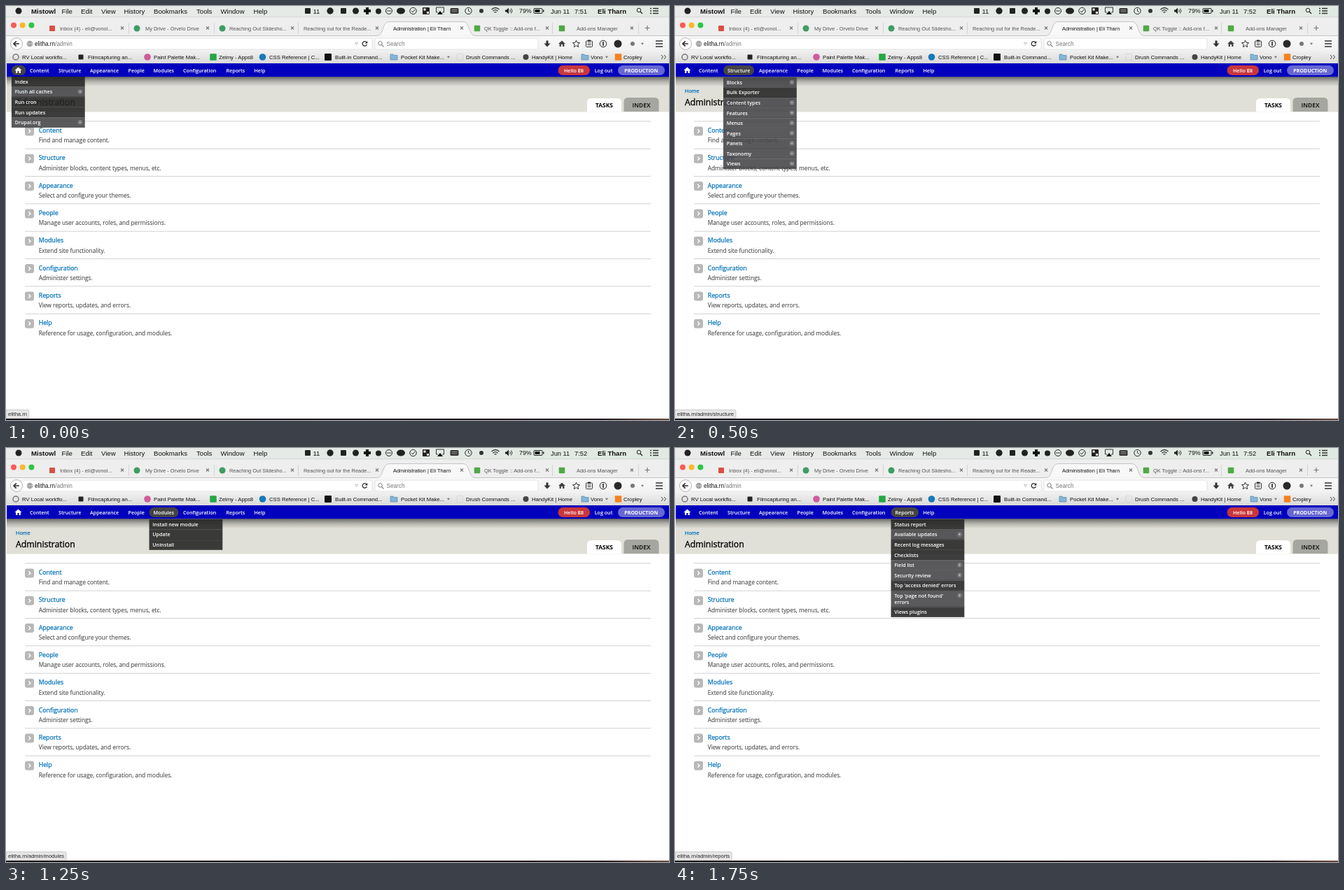
An HTML page for the animation above (2 s loop, 947 by 592 pixels).

```html
<!DOCTYPE html>
<html lang="en">
<head>
<meta charset="utf-8">
<title>Admin menu tour</title>
<style>
  html, body { margin: 0; width: 100%; height: 100%; overflow: hidden; background: #fff; }
  svg { display: block; width: 947px; height: 592px; }
  text { white-space: pre; }
  .ui { font-family: "Liberation Sans", Arial, sans-serif; }
  .page { font-family: "Open Sans", "Noto Sans", sans-serif; }
  .bar { font-size: 9.6px; fill: #111; }
  .tab { font-size: 7.4px; fill: #555; }
  .mark { font-size: 7.7px; fill: #111; }
  .url { font-size: 8.2px; fill: #111; }
  .status { font-size: 7.55px; fill: #222; }
  .nav { font-size: 7.15px; font-weight: 600; fill: #fff; }
  .link { font-size: 8.8px; fill: #0071b8; stroke: #0071b8; stroke-width: .25px; }
  .title { font-size: 12.3px; fill: #000; stroke: #000; stroke-width: .3px; }
  .desc { font-size: 8.33px; fill: #444; stroke: #444; stroke-width: .08px; }
  .task { font-size: 8.4px; font-weight: 700; text-anchor: middle; }
  .line { fill: none; stroke: #333; stroke-width: 1; }
</style>
</head>
<body>
<svg id="stage" viewBox="0 0 947 592" xmlns="http://www.w3.org/2000/svg"></svg>
<script>
const STEP = 250;
const HOST = 'elitha.rn';

const rect = (x, y, w, h, fill, r = 0, more = '') =>
  `<rect x="${x}" y="${y}" width="${w}" height="${h}" rx="${r}" fill="${fill}" ${more}/>`;
const dot = (x, y, r, fill, more = '') =>
  `<circle cx="${x}" cy="${y}" r="${r}" fill="${fill}" ${more}/>`;
const path = (d, more = 'class="line"') => `<path d="${d}" ${more}/>`;
const text = (x, y, s, cls, more = '') => `<text x="${x}" y="${y}" class="${cls}" ${more}>${s}</text>`;
const square = (x, y, size, fill) => rect(x - size / 2, y - size / 2, size, size, fill, 1);
const ring = (x, y, r, color = '#222', w = 1) =>
  dot(x, y, r, 'none', `stroke="${color}" stroke-width="${w}"`);
const solid = (d, fill = '#333') => path(d, `fill="${fill}"`);
const down = (x, y) => solid(`M${x - 2} ${y - 1.3}h4l-2 3z`, '#777');
const lens = (x, y, color) =>
  ring(x - 1, y - 1, 2.8, color) + path(`M${x + 1} ${y + 1}l3 3`, `stroke="${color}" stroke-width="1.2"`);
const cross = (x, y) => path(`M${x - 2} ${y - 2}l4 4m0 -4l-4 4`, 'stroke="#777" stroke-width="1.1"');
const house = (x, y, fill) =>
  solid(`M${x - 5} ${y}L${x} ${y - 4.5}L${x + 5} ${y}H${x + 3.4}V${y + 4}H${x + 1.1}V${y + 1}H${x - 1.1}V${y + 4}H${x - 3.4}V${y}Z`, fill);
const folder = (x, y) =>
  path(`M${x - 5} ${y + 4}v-8h4l1 1.5h5v6.5z`, 'fill="#86b5d6" stroke="#5588aa" stroke-width=".7"');
const gradient = (id, vertical, stops) =>
  `<linearGradient id="${id}" x2="${vertical ? 0 : 1}" y2="${vertical ? 1 : 0}">`
  + stops.map(([at, color]) => `<stop offset="${at}" stop-color="${color}"/>`).join('') + '</linearGradient>';

function menuBar() {
  const words = [[79.5, 'File'], [107, 'Edit'], [136, 'View'], [168.5, 'History'], [211, 'Bookmarks'],
    [272, 'Tools'], [306.5, 'Window'], [353.5, 'Help']];
  let s = rect(0, 0, 947, 16, 'url(#top)') + dot(18, 7, 4.5, '#222');
  s += text(36, 10.5, 'Mistowl', 'ui bar', 'font-weight="700"');
  s += words.map(([x, w]) => text(x, 10.5, w, 'ui bar')).join('');
  s += square(431, 7, 8, '#222') + text(438.5, 10.5, '11', 'ui bar');
  s += dot(463, 7, 4.7, '#222') + square(482, 7, 8, '#222') + dot(499.5, 7, 4.5, '#222');
  s += path('M516 2v10M511 7h10', 'stroke="#111" stroke-width="4"');
  s += dot(532, 7.5, 4, '#222') + ring(547, 7, 4.5) + path('M544 7h6');
  s += `<ellipse cx="564" cy="7" rx="6" ry="4.5" fill="#222"/>`;
  s += ring(581.5, 7, 4.7) + path('M579 7l2 2l3 -4');
  s += rect(595, 2, 10, 10, '#222', 1) + rect(596.5, 3.5, 3, 3, '#fff') + rect(601, 8, 3, 3, '#fff');
  s += path('M617 9h-2.5v-7h11v7H623') + solid('M620 7l4 5h-8z', '#111');
  s += rect(634.5, 3, 12, 8, '#333', 1.5) + path('M636.5 5.5h8M636.5 8h8', 'stroke="#bbb" stroke-width=".8"');
  s += ring(660.5, 7, 4.7) + path('M660.5 4v3l2.3 1.5') + dot(679, 7, 3, '#333');
  s += path('M693.5 5q5.5 -5 11 0M695.5 7.2q3.5 -3.2 7 0M697.5 9.3q1.5 -1.2 3 0', 'class="line" style="stroke-width:1.3"');
  s += solid('M713 5.5h2l3 -3v9l-3 -3h-2z', '#222') + path('M719.5 5q2 2 0 4M721.5 3.5q3 3.5 0 7');
  s += text(733, 10.4, '79%', 'ui bar', 'style="font-size:8.8px"');
  s += rect(754, 3.5, 12, 7, 'none', 1, 'stroke="#222"') + rect(755.5, 5, 7, 4, '#111') + rect(767, 5.5, 1.5, 3, '#222');
  s += text(778, 10.5, 'Jun 11', 'ui bar', 'style="font-size:9.3px"');
  s += text(812, 10.5, '', 'ui bar', 'id="clock" style="font-size:9.3px"');
  s += text(845, 10.5, 'Eli Tharn', 'ui bar', 'font-weight="700"');
  s += lens(905, 7, '#222') + path('M920 3.5h2M924 3.5h8M920 7h2M924 7h8M920 10.5h2M924 10.5h8', 'class="line" style="stroke-width:1.4"');
  return s;
}

function tabStrip() {
  const tabs = [[77, 'Inbox (4) - eli@vonol...', 166], [199, 'My Drive - Orvelo Drive', 288],
    [319, 'Reaching Out Slidesho...', 409], [425, 'Reaching out for the Reade...', 530],
    [553, 'Administration | Eli Tharn', 651], [683, 'QK Toggle :: Add-ons f...', 773], [815, 'Add-ons Manager', 894]];
  let s = rect(0, 16, 947, 27, '#eeeeee') + rect(0, 15.5, 947, .7, '#ccc');
  s += ['#fc5b57', '#f9b82c', '#2ec544'].map((c, i) => dot(11 + i * 12.7, 27.5, 4, c)).join('');
  s += path('M0 42.5H530C540 42 537 22.5 547 22.5H653C663 22.5 660 42 670 42.5H947', 'fill="#f8f8f8" stroke="#b9b9b9" stroke-width=".8"');
  s += [175, 297, 417, 780, 903].map(x => rect(x, 24, .8, 16, '#ccc')).join('');
  s += square(66, 32, 8, '#d95043') + dot(187, 32, 4.5, '#3f9c65') + dot(309, 32, 4.5, '#3f9c65');
  s += square(673, 32, 8.5, '#4fa944') + square(794, 32, 8.5, '#4fa944');
  s += tabs.map(([x, w, end], i) =>
    text(x, 34.7, w, 'ui tab', i === 4 ? 'style="fill:#111"' : '') + cross(end, 31.5)).join('');
  return s + path('M912.5 31.5h7M916 28v7', 'stroke="#777" stroke-width="1.2"');
}

function toolbar() {
  let s = rect(0, 43, 947, 39, 'url(#tools)');
  s += rect(20, 46, 503, 16, '#fff', 2, 'stroke="#ddd" stroke-width=".8"');
  s += rect(527, 46, 233, 16, '#fff', 2, 'stroke="#ddd" stroke-width=".8"');
  s += dot(15, 54, 8.5, '#fff', 'stroke="#aaa" stroke-width=".9"');
  s += path('M19 54H11.5M14.8 50.3L11 54L14.8 57.7', 'class="line" style="stroke-width:1.7"');
  s += dot(34, 54, 4.3, '#8a8a8a') + path('M30 54h8M34 50v8M32 50.5q-2 3.5 0 7M36 50.5q2 3.5 0 7', 'fill="none" stroke="#eee" stroke-width=".6"');
  s += text(41, 57, `${HOST}<tspan fill="#777">/admin</tspan>`, 'ui url');
  s += path('M498.5 52.5h4l-2 3z', 'fill="none" stroke="#aaa" stroke-width=".7"');
  s += path('M515 52A3.2 3.2 0 1 0 515.4 55', 'class="line" style="stroke-width:1.3"') + solid('M516.3 50v3.6h-3.6z');
  s += lens(535.5, 54.3, '#777') + text(543.5, 57, 'Search', 'ui url', 'style="fill:#777"');
  s += path('M773 49.5v5', 'stroke="#333" stroke-width="3"') + solid('M768.5 53.5h9l-4.5 5z') + house(794, 54, '#444');
  s += path('M814.5 49l1.5 3.4 3.6 .3-2.8 2.4 .9 3.6-3.2-2-3.2 2 .9-3.6-2.8-2.4 3.6-.3z');
  s += rect(828.5, 50, 9, 8.5, 'none', 1, 'stroke="#333"') + path('M830.5 53h5M830.5 55.5h5') + rect(831, 48.5, 4, 2.5, '#333');
  s += ring(853, 54, 4.8) + path('M853 51v6', 'stroke="#222" stroke-width="1.6"');
  s += dot(874, 54, 5.5, '#292929') + dot(895, 54, 3, '#777') + down(909, 54);
  return s + path('M928 50h10M928 54h10M928 58h10', 'class="line" style="stroke-width:1.7"');
}

function bookmarks() {
  const marks = [[23, 'RV Local workflo...'], [117, 'Filmcapturing an...'], [211, 'Paint Palette Mak...'],
    [304, 'Zelmy - Apps8'], [376, 'CSS Reference | C...'], [470, 'Built-in Command...'],
    [564, 'Pocket Kit Make...'], [657, 'Drush Commands ...'], [751, 'HandyKit | Home'],
    [835, 'Vono'], [882, 'Cropley']];
  let s = ring(14, 73, 4, '#777', 1.5) + square(107, 73, 7, '#222') + dot(202, 73, 4.8, '#d05b9b');
  s += square(296, 73, 9.5, '#26a744') + dot(366.5, 73, 4.8, '#1579b8') + square(460, 73, 10, '#111');
  s += folder(554, 73) + folder(827, 73) + down(632, 73) + down(858, 73);
  s += rect(644, 68.5, 8.5, 9, 'none', 1, 'stroke="#bbb" stroke-width=".7" stroke-dasharray="1 1"');
  s += dot(742.5, 73, 4, '#444') + square(874.5, 73, 9.5, '#f58220');
  s += marks.map(([x, w]) => text(x, 75.8, w, 'ui mark')).join('');
  return s + path('M936 70l2.5 3-2.5 3M940 70l2.5 3-2.5 3', 'class="line" style="stroke-width:.9"');
}

function page() {
  const rows = [['Content', 'Find and manage content.'], ['Structure', 'Administer blocks, content types, menus, etc.'],
    ['Appearance', 'Select and configure your themes.'], ['People', 'Manage user accounts, roles, and permissions.'],
    ['Modules', 'Extend site functionality.'], ['Configuration', 'Administer settings.'],
    ['Reports', 'View reports, updates, and errors.'], ['Help', 'Reference for usage, configuration, and modules.']];
  let s = rect(1, 101, 946, 50.5, '#e0e0d8') + rect(1, 101, 946, 14, 'url(#shade)');
  s += text(14, 124.3, 'Home', 'page link', 'style="font-size:7.3px"');
  s += text(14, 142.3, 'Administration', 'page title');
  s += solid('M830 151.5V138q0-6 6-6h37q6 0 6 6v13.5z', '#fff');
  s += solid('M882.5 151V137q0-6 6-6h38q6 0 6 6v14z', '#a6a6a0');
  s += text(854.5, 144.7, 'TASKS', 'page task') + text(907.5, 144.7, 'INDEX', 'page task', 'fill="#222"');
  rows.forEach(([title, desc], i) => {
    const y = 164.8 + i * 39.33;
    s += rect(27, y - .4, 894, .9, '#cccccc') + rect(27, y + 7.6, 13, 13, '#b8b8b8', 3);
    s += path(`M32.3 ${y + 11.5}l2.7 2.6-2.7 2.6`, 'fill="none" stroke="#fff" stroke-width="1.4"');
    s += text(46.7, y + 16.2, title, 'page link') + text(46.7, y + 30.4, desc, 'page desc');
  });
  return s + rect(0, 590, 947, 2, 'url(#desk)');
}

const NAV = [['Content', 34, 28], ['Structure', 75, 31.5], ['Appearance', 120, 41], ['People', 174.5, 23.5],
  ['Modules', 210.5, 29.5], ['Configuration', 253, 48.5], ['Reports', 314.5, 27], ['Help', 354.5, 16]];

function navBar() {
  let s = house(17.5, 92, '#fff') + NAV.map(([w, x]) => text(x, 94.6, w, 'page nav')).join('');
  s += rect(788.5, 85, 45.5, 14, '#c9363b', 7);
  s += text(811, 94.6, 'Hello <tspan font-weight="700">Eli</tspan>', 'page nav', 'text-anchor="middle"');
  s += text(840.7, 94.6, 'Log out', 'page nav') + rect(874, 85, 67, 14, '#6767d3', 7);
  return s + text(907.3, 94.6, 'PRODUCTION', 'page nav', 'text-anchor="middle" style="font-weight:700"');
}

// "+" marks an entry with children, "|" breaks its label.
const SCENES = [
  [-1, '', ['Index', '+Flush all caches', 'Run cron', 'Run updates', '+Drupal.org']],
  [0, '/admin/content', ['+Add content', '+Comments', 'Files']],
  [1, '/admin/structure', ['+Blocks', 'Bulk Exporter', '+Content types', '+Features', '+Menus', '+Pages', '+Panels', '+Taxonomy', '+Views']],
  [2, '/admin/appearance', ['Install new theme', 'Update', '+Settings', '+Style guide']],
  [3, '/admin/people', ['Add user', '+Permissions']],
  [4, '/admin/modules', ['Install new module', 'Update', 'Uninstall']],
  [5, '/admin/config', ['+Administration', '+Content authoring', '+Development', '+Media', '+People',
    '+Regional and language', '+Search and metadata', '+System', '+User interface', '+Web services']],
  [6, '/admin/reports', ['Status report', '+Available updates', 'Recent log messages', 'Checklists', '+Field list',
    '+Security review', "Top 'access denied' errors", "+Top 'page not found'|errors", 'Views plugins']],
];

function dropdown(x, y, items) {
  let s = '';
  for (const item of items) {
    const parent = item[0] === '+';
    const lines = item.replace('+', '').split('|');
    const h = 14.55 + (lines.length - 1) * 8.8;
    s += rect(x, y, 104.8, h, parent ? '#464649' : '#262626', 0, 'opacity=".89"');
    s += rect(x, y + h - .7, 104.8, .7, '#222', 0, 'opacity=".4"');
    lines.forEach((w, i) => { s += text(x + 4.8, y + 9.9 + i * 8.8, w, 'page nav'); });
    if (parent) {
      const cx = x + 98, cy = y + 7;
      s += rect(cx - 2.5, cy - 2.5, 5, 5, 'none', 1, 'stroke="#a5a5a8" stroke-width=".7"');
      s += path(`M${cx - 1.6} ${cy}h3.2M${cx} ${cy - 1.6}v3.2`, 'stroke="#ddd" stroke-width=".8"');
    }
    y += h;
  }
  return s;
}

function scene([index, route, items]) {
  const home = index < 0;
  const [, x, w] = home ? ['', 13.9, 8] : NAV[index];
  return '<g class="scene">' + rect(x - 6, 85, w + 12.5, 14, '#444', 7)
    + dropdown(x - 6, home ? 101 : 102, items)
    + '<g class="status-box">' + path('', 'fill="#e6e6e6" stroke="#bbb" stroke-width=".7"')
    + text(3, 586.2, HOST + route, 'ui status') + '</g></g>';
}

const stage = document.getElementById('stage');
stage.innerHTML = '<defs>'
  + gradient('top', false, [[0, '#e9eae9'], [1, '#e0e9e2']])
  + gradient('tools', true, [[0, '#f8f8f8'], [.5, '#f2f2f2'], [1, '#dadada']])
  + gradient('shade', true, [[0, '#0008'], [.5, '#0003'], [1, '#0000']])
  + gradient('desk', false, [[0, '#141014'], [.9, '#241a1e'], [1, '#6b4a3c']])
  + '</defs>' + menuBar() + tabStrip() + toolbar() + bookmarks() + page()
  + rect(1, 82, 946, 19.2, '#0000bd') + SCENES.map(scene).join('') + navBar();

for (const box of stage.querySelectorAll('.status-box')) {
  const end = 6 + box.querySelector('text').getComputedTextLength();
  box.querySelector('path').setAttribute('d', `M0 589V577.5H${end - 2}q2 0 2 2V589z`);
}

const scenes = [...stage.querySelectorAll('.scene')];
const clock = document.getElementById('clock');
const start = performance.now();

function draw(now) {
  const current = Math.floor(Math.max(0, now - start) / STEP) % scenes.length;
  scenes.forEach((g, i) => { g.style.display = i === current ? '' : 'none'; });
  clock.textContent = current === 0 ? '7:51' : '7:52';
  requestAnimationFrame(draw);
}
draw(start);
</script>
</body>
</html>
```
